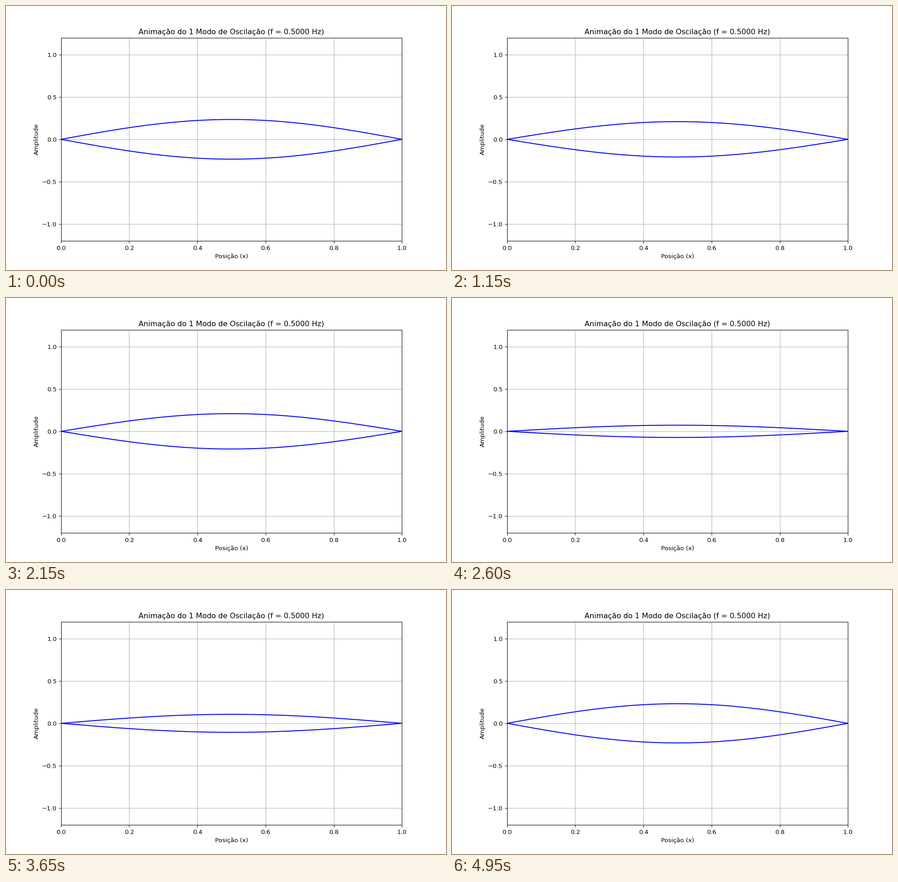
Recreate the animation shown at these times as a matplotlib script. Size 966 by 580 pixels, loop 5 s.

```python
import numpy as np
import matplotlib.pyplot as plt
from matplotlib.animation import FuncAnimation

WIDTH, HEIGHT, DPI = 966, 580, 96.6
FRAMES, INTERVAL = 100, 50

LENGTH = 1.0
MODE = 1
FREQ = 0.5
PLUCK_X, PLUCK_H = 0.3, 0.3

plt.rcParams["font.family"] = "DejaVu Sans"

# Fourier coefficient of a plucked string for the chosen mode
amplitude = (2 * PLUCK_H * LENGTH**2 * np.sin(MODE * np.pi * PLUCK_X / LENGTH)
             / (MODE**2 * np.pi**2 * PLUCK_X * (LENGTH - PLUCK_X)))
x = np.linspace(0, LENGTH, 500)
shape = amplitude * np.sin(MODE * np.pi * x / LENGTH)

# The tiny margin keeps the pixel size from being truncated down
eps = 1e-9
fig, ax = plt.subplots(figsize=((WIDTH + eps) / DPI, (HEIGHT + eps) / DPI), dpi=DPI)
upper, = ax.plot(x, shape, color="blue", lw=1.5)
lower, = ax.plot(x, -shape, color="blue", lw=1.5)

ax.set_xlim(0, LENGTH)
ax.set_ylim(-1.2, 1.2)
ax.set_yticks(np.arange(-1, 1.1, 0.5))
ax.set_xlabel("Posição (x)")
ax.set_ylabel("Amplitude")
ax.set_title(f"Animação do {MODE} Modo de Oscilação (f = {FREQ:.4f} Hz)")
ax.grid(True)


def update(frame):
    t = frame * INTERVAL / 1000
    y = shape * np.cos(2 * np.pi * FREQ * t)
    upper.set_ydata(y)
    lower.set_ydata(-y)
    return upper, lower


anim = FuncAnimation(fig, update, frames=FRAMES, interval=INTERVAL,
                     repeat=True, repeat_delay=0, blit=False)
plt.show()
```
